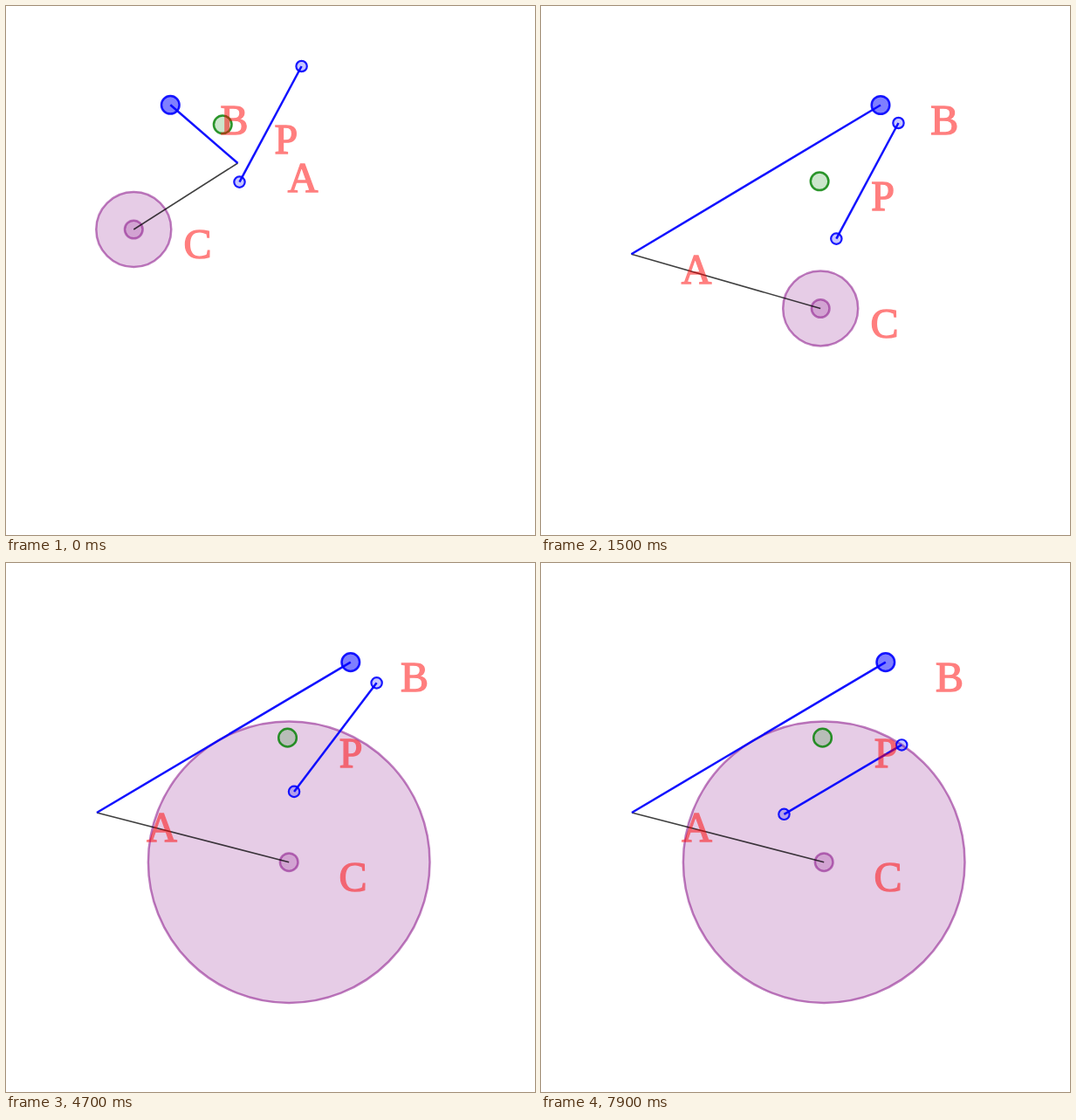
An HTML page for the animation above (8 s loop, 606x606 px).

```html
<!DOCTYPE html>
<html lang="en">
<head>
<meta charset="utf-8">
<title>Triangle, circle and bar</title>
<style>
  html, body { margin: 0; width: 100%; height: 100%; overflow: hidden; background: #fff; }
  svg { display: block; width: 606px; height: 606px; stroke-width: 2.5px; }
  .purple { fill: rgba(128,0,128,.2); stroke: rgba(128,0,128,.5); }
  .green { fill: rgba(0,128,0,.2); stroke: rgba(0,128,0,.82); }
  .blue { fill: rgba(0,0,255,.5); stroke: rgba(0,0,255,.9); }
  .end { fill: rgba(0,0,255,.22); stroke: rgba(0,0,255,.9); stroke-width: 2.2px; }
  .thin { stroke: rgba(0,0,0,.75); stroke-width: 1.6px; }
  .thick { stroke: rgba(0,0,255,.93); }
  text { font: 48px "Liberation Serif", "Times New Roman", serif;
         fill: red; stroke: red; stroke-width: 1.4px; opacity: .5; }
</style>
</head>
<body>
<svg viewBox="0 0 606 606">
  <circle id="ring" class="purple"/>
  <circle id="dotC" class="purple" r="10.3"/>
  <circle id="dotP" class="green" r="10.3"/>
  <circle id="dotB" class="blue" r="10.3"/>
  <circle id="top" class="end" r="6.2"/>
  <circle id="low" class="end" r="6.2"/>
  <line id="sideC" class="thin"/>
  <line id="sideB" class="thick"/>
  <line id="bar" class="thick"/>
  <text id="nameA">A</text>
  <text id="nameB">B</text>
  <text id="nameC">C</text>
  <text id="nameP">P</text>
</svg>
<script>
const LOOP = 8000, STEP = 200;

const mix = (a, b, u) => a + (b - a) * u;
const add = (p, x, y) => [p[0] + x, p[1] + y];

// Position on a polyline: u = 1 is the second point, u = 2 the third
function along(points, u) {
  const i = Math.min(Math.floor(u), points.length - 2);
  return points[i].map((v, n) => mix(v, points[i + 1][n], u - i));
}

function set(id, attrs) {
  const el = document.getElementById(id);
  for (const key in attrs) el.setAttribute(key, attrs[key]);
}
const dot = (id, [cx, cy]) => set(id, { cx, cy });
const line = (id, [x1, y1], [x2, y2]) => set(id, { x1, y1, x2, y2 });
const label = (id, p, dx = 57.2) => set(id, { x: p[0] + dx, y: p[1] + 33.4 });

const pathA = [[265.5, 180], [103.5, 279.5], [103.5, 284.3], [104, 286]];
const pathB = [[188.3, 113.3], [311.2, 113.8], [389, 113.5], [394.8, 113.6]];
const pathC = [[146.3, 256], [227, 420], [320.2, 346.5], [324.2, 342.7]];

function draw(t) {
  // Progress 0..1 of a move made in equal jumps
  const move = (first, jumps) =>
    Math.max(0, Math.min(jumps, Math.floor((t - first) / STEP) + 1)) / jumps;

  const settle = move(1700, 2);
  const swing = move(100, 5) + move(1100, 3) + settle;
  const A = along(pathA, swing), B = along(pathB, swing);
  const C = along(pathC, move(100, 4) + move(900, 4) + settle);

  // P keeps a fixed offset from the centroid; the bar follows P
  const P = [(A[0] + B[0] + C[0]) / 3 + 48.2, (A[1] + B[1] + C[1]) / 3 - 47.3];
  const slide = move(6300, 9);
  const mid = add(P, mix(54.8, 23.3, slide), mix(-0.5, 48, slide));
  const angle = (61.8 - 21 * move(4200, 7) - 10.3 * move(6200, 1)) * Math.PI / 180;
  const half = mix(75.25, 78.2, move(2900, 4));
  const dx = half * Math.cos(angle), dy = half * Math.sin(angle);
  const top = add(mid, dx, -dy), low = add(mid, -dx, dy);

  set('ring', { r: mix(43, 161.3, move(2200, 3) ** 2.5) });
  dot('ring', C);
  dot('dotC', C);
  dot('dotP', P);
  dot('dotB', B);
  dot('top', top);
  dot('low', low);
  line('sideC', A, C);
  line('sideB', A, B);
  line('bar', top, low);
  label('nameA', A);
  label('nameB', B);
  label('nameC', C);
  label('nameP', P, 59.2);
}

const start = performance.now();
function frame() {
  draw((performance.now() - start) % LOOP);
  requestAnimationFrame(frame);
}
frame();
</script>
</body>
</html>
```
